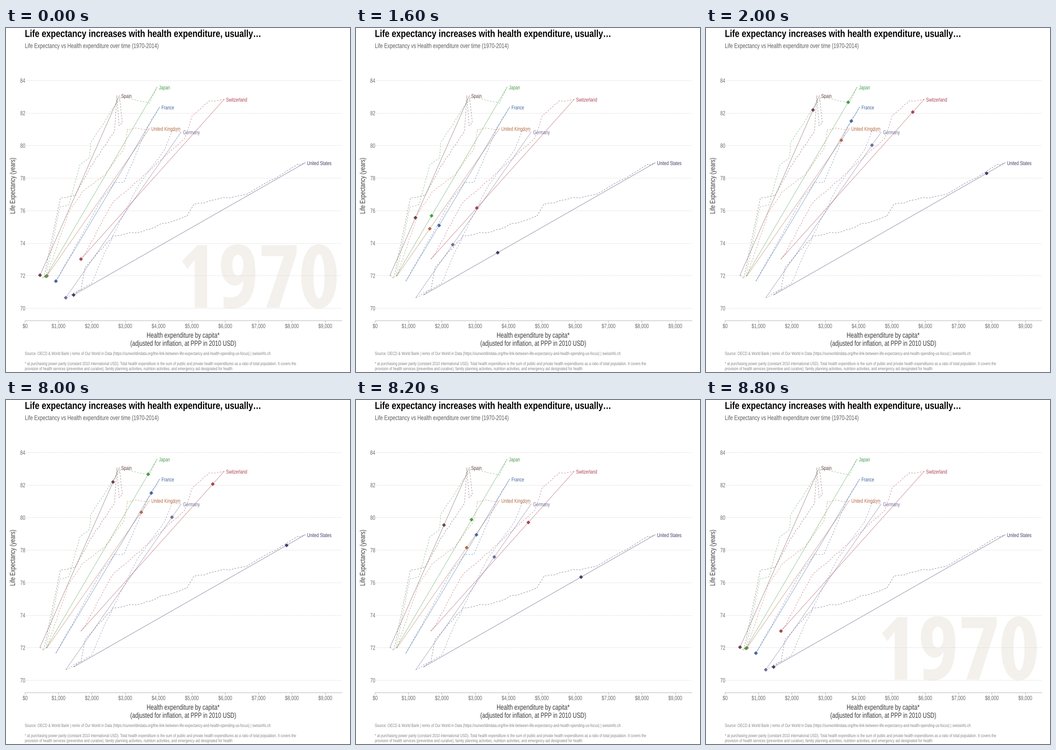
A matplotlib script for the animation above (10 s loop, 748 by 748 pixels).

```python
import matplotlib.pyplot as plt
import numpy as np
from matplotlib.animation import FuncAnimation
from matplotlib.patches import PathPatch
from matplotlib.path import Path
from matplotlib.textpath import TextPath
from matplotlib.transforms import Affine2D

SIZE = 748
DPI = 68
PX = 72 / DPI
STEP = 200
LOOP = 10000
X0, X_STEP = 41.5, 72.5      # $0 and pixels per $1,000
Y70, Y_STEP = 609, 35.36     # 70 years and pixels per year
NARROW = {"normal": 0.74, "bold": 0.81}   # condensed face
NOTE = "#858585"

rng = np.random.default_rng(7)
fig = plt.figure(figsize=(SIZE / DPI, SIZE / DPI), dpi=DPI, facecolor="white")
ax = fig.add_axes([0, 0, 1, 1])
ax.set_xlim(0, SIZE)
ax.set_ylim(SIZE, 0)
ax.axis("off")


def label(x, y, text, size, color, align=0.0, weight="normal", angle=0):
    """Condensed text on baseline y; align 0 = left, 0.5 = centre, 1 = right."""
    path = TextPath((0, 0), text, size=size,
                    prop={"family": "Liberation Sans", "weight": weight})
    path = path.transformed(Affine2D().scale(NARROW[weight], -1))
    shift = align * path.get_extents().x1
    move = Affine2D().translate(-shift, 0).rotate_deg(angle).translate(x, y)
    ax.add_patch(PathPatch(path.transformed(move), fc=color, lw=0, zorder=5))


def contour(*points):
    """Closed outline: pairs are corners, six numbers are a cubic curve."""
    verts, codes = [], []
    for p in points:
        pairs = np.reshape(p, (-1, 2))
        verts.extend(pairs)
        codes += [Path.CURVE4] * 3 if len(pairs) == 3 else [Path.LINETO]
    codes[0] = Path.MOVETO
    return Path(verts + [verts[0]], codes + [Path.CLOSEPOLY])


def oval(cx, cy, rx, ry, k=0.6):
    """Rounded ellipse; a negative ry turns it into a hole."""
    turn = [(0, 1), (1, 0), (0, -1), (-1, 0), (0, 1)]
    points = [(cx, cy + ry)]
    for (ax_, ay), (bx, by) in zip(turn, turn[1:]):
        unit = [(ax_ + k * bx, ay + k * by), (bx + k * ax_, by + k * ay),
                (bx, by)]
        points.append([v for u, w in unit for v in (cx + rx * u, cy + ry * w)])
    return contour(*points)


DIGITS = {
    "0": [oval(44, 68, 38.5, 70), oval(44, 68, 12, -48)],
    "1": [contour((64, 0), (37, 0), (37, 104), (21, 84), (9.5, 101),
                  (43, 136), (64, 136))],
    "2": [contour((82, 0), (6, 0), (6, 20), (33, 56),
                  (55, 82, 60, 115, 38, 115), (28, 115, 22, 109, 15, 102),
                  (5.5, 119), (16, 132, 26, 138, 41, 138),
                  (80, 138, 92, 95, 58, 49), (39, 23), (82, 23))],
    "4": [contour((87, 28), (73, 28), (73, 0), (47, 0), (47, 28), (3, 28),
                  (3, 49), (48, 136), (73, 136), (73, 51), (87, 51)),
          contour((47, 51), (48, 104), (26, 51))],
    "7": [contour((7, 136), (83, 136), (83, 118), (45, 0), (17, 0),
                  (55, 112), (7, 112))],
    "9": [contour((81, 78), (81, 118, 69, 138, 43, 138),
                  (20, 138, 6, 120, 6, 92), (6, 50, 40, 35, 55, 60),
                  (54, 28, 40, 17, 12, 24), (12, 0),
                  (60, -10, 81, 18, 81, 78)),
          oval(43, 92, 12, 23)],
}


def big_year(text, left=373.4, base=608, advance=87.75):
    parts = [outline.transformed(
                 Affine2D().scale(1, -1).translate(left + i * advance, base))
             for i, d in enumerate(text) for outline in DIGITS[d]]
    path = Path.make_compound_path(*parts)
    return ax.add_patch(PathPatch(path, fc="#f4f1ed", lw=0, zorder=0))


def trail(points, years=44, wobble=1.2):
    """Yearly path through the key points with small random deviations."""
    x, y = np.array(points, float).T
    knots = np.append(0, np.cumsum(np.hypot(np.diff(x), np.diff(y))))
    t = np.union1d(knots, np.linspace(0, knots[-1], years + 1))
    noise = rng.normal(0, wobble, len(t))
    noise[[0, -1]] = 0
    return np.interp(t, knots, x), np.interp(t, knots, y) + noise


starts, ends, colors = [], [], []


def country(name, color, start, end, *turns):
    ax.plot(*trail([start, *turns, end]), color=color, lw=0.85 * PX, alpha=0.7,
            ls=(0, (4, 3.5)), dash_capstyle="butt", zorder=2)
    ax.plot(*zip(start, end), color=color, lw=0.8 * PX, alpha=0.7, zorder=3)
    label(end[0] + 4, end[1] + 5, name, 12, color)
    starts.append(start)
    ends.append(end)
    colors.append(color)


# Headings, grid and axes
label(41, 19.5, "Life expectancy increases with health expenditure, usually…",
      22, "black", weight="bold")
label(41, 43.5, "Life Expectancy vs Health expenditure over time (1970-2014)",
      14.5, "#5c5c5c")

for year in range(70, 85, 2):
    y = Y70 - (year - 70) * Y_STEP
    ax.plot([44, 730], [y, y], color="#cccccc", lw=PX, ls=(0, (1.5, 2)),
            dash_capstyle="butt", zorder=1)
    label(41.5, y + 5, str(year), 13.3, "#6a6a6a", 1)

ax.plot([41, 730], [635.5, 635.5], color="#b5b5b5", lw=PX, zorder=1)
for k in range(10):
    x = X0 + k * X_STEP
    ax.plot([x, x], [636, 640], color="#b5b5b5", lw=PX, zorder=1)
    label(x, 652.5, f"${k},000" if k else "$0", 13.3, "#6a6a6a", 0.5)

label(385, 673.5, "Health expenditure by capita*", 16.4, "#3a3a3a", 0.5)
label(385, 691, "(adjusted for inflation, at PPP in 2010 USD)", 16.2,
      "#3a3a3a", 0.5)
label(19.5, 343.5, "Life Expectancy (years)", 15.8, "#3a3a3a", 0.5, angle=-90)

label(41, 711, "Source: OECD & World Bank | remix of Our World in Data "
      "(https://ourworldindata.org/the-link-between-life-expectancy-and-"
      "health-spending-us-focus) | swissinfo.ch", 10, NOTE)
label(41, 733, "* at purchasing power parity (constant 2010 international "
      "USD). Total health expenditure is the sum of public and private health "
      "expenditures as a ratio of total population. It covers the", 9.9, NOTE)
label(41, 744, "provision of health services (preventive and curative), "
      "family planning activities, nutrition activities, and emergency aid "
      "designated for health", 9.9, NOTE)

# Start, end and the main turns of each trail, in stage pixels
country("France", "#44659f", (108.5, 550.5), (334, 172),
        (210, 370), (235, 338), (257, 335), (309, 212))
country("Germany", "#706d98", (130, 586.5), (381, 226),
        (186, 555), (214, 490), (285, 347), (345, 264), (361, 224))
country("Spain", "#6a444c", (74, 537.5), (246.5, 147),
        (82, 545), (118, 371), (150, 364), (186, 300), (236, 224),
        (241, 148), (246, 213), (253, 205))
country("Switzerland", "#ab4451", (163, 502.5), (474.5, 155),
        (173, 490), (207, 425), (234, 377), (270, 348), (390, 238),
        (405, 190), (440, 160))
country("United Kingdom", "#b56a45", (89, 539), (312, 218.5),
        (136, 402), (165, 358), (217, 317), (257, 262), (264, 223))
country("United States", "#433e69", (147, 580.5), (650.5, 293),
        (163, 568), (172, 520), (232, 454), (305, 439), (393, 410),
        (408, 383), (525, 360), (635, 297))
country("Japan", "#479d4a", (87, 540), (328.5, 128.5),
        (117, 390), (138, 382), (160, 299), (182, 282), (184, 248),
        (250, 150), (312, 163))

starts, ends = np.array(starts), np.array(ends)
dots = ax.scatter(*starts.T, s=(6 * PX) ** 2, c=colors, marker="D",
                  linewidths=0, zorder=6)
first, last = big_year("1970"), big_year("2014")


def ease(t):
    """Quadratic in and out."""
    return 2 * t * t if t < 0.5 else 1 - 2 * (1 - t) ** 2


def update(i):
    ms = i * STEP
    t = min(max(min(ms - 1200, 8800 - ms) / 1000, 0), 1)
    dots.set_offsets(starts + (ends - starts) * ease(t))
    first.set_visible(t == 0)
    last.set_visible(t == 1)
    return dots, first, last


anim = FuncAnimation(fig, update, frames=LOOP // STEP, interval=STEP,
                     repeat=True, repeat_delay=0)
plt.show()
```
